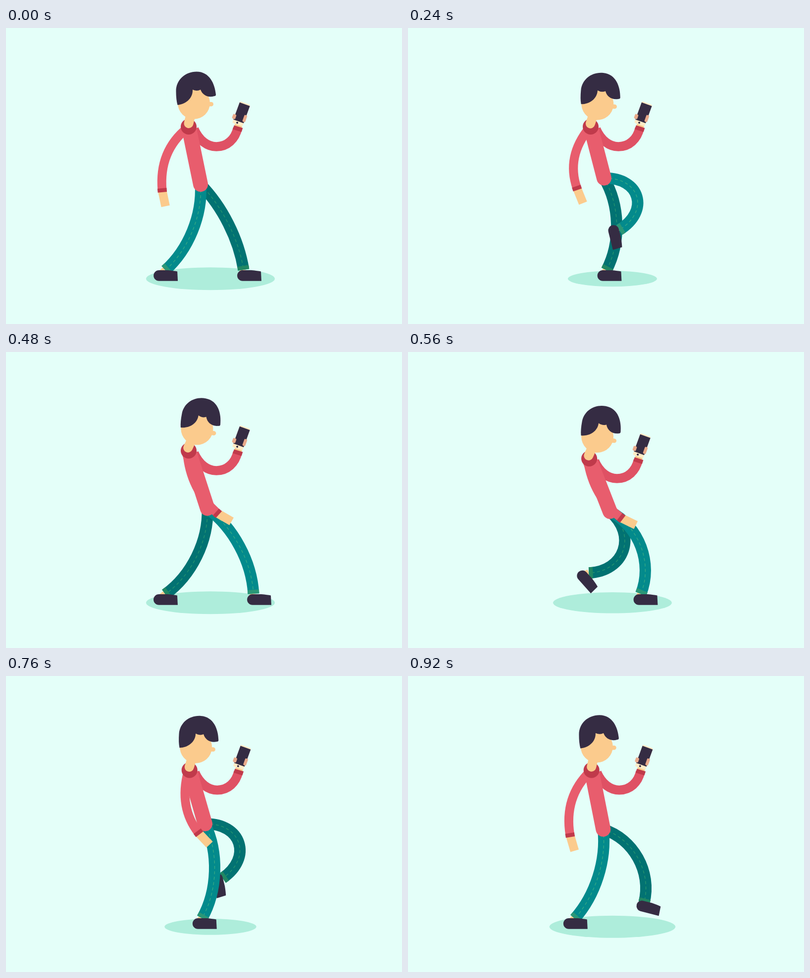
An HTML page with a canvas that plays this animation: 800x600 px, repeating every 0.96 s.

```html
<!DOCTYPE html>
<html lang="en">
<head>
<meta charset="utf-8">
<title>Walking with a phone</title>
<style>
html, body { margin: 0; width: 100%; height: 100%; overflow: hidden; background: #e4fff9; }
canvas { display: block; }
</style>
</head>
<body>
<canvas id="stage" width="800" height="600"></canvas>
<script>
const ctx = document.getElementById('stage').getContext('2d');
const LOOP = 960, HALF = LOOP / 2, STEP = 40, TAU = Math.PI * 2;
const INK = '#352c43', SKIN = '#fbcb8d', SHIRT = '#e85d6d', SLEEVE = '#df5164',
      RIB = '#c03a4b', CREAM = '#fdebc6', FINGER = '#e9aa8b';
const GROUND = 502, LIFT_OFF = 309;
const NEAR = { side: 1, land: 498, cloth: '#038a8c', cuff: '#2b9777', stitch: '#35a885' };
const FAR = { side: -1, land: 478, cloth: '#027272', cuff: '#218763', stitch: '#26946f' };

const HAIR = new Path2D('M346.5 156Q343.5 145 343.5 128C343.5 105 362 88.5 385 88.5C411 88.5 422 113 424 135' +
  'Q424 138 421 138C408 142 397 136 393 125Q386 129 377 125C378 143 362 155 346.5 156Z');
const SHOE = new Path2D('M0 -11H18Q30 -10 37 -8.5L38 10.8H0A10.9 10.9 0 0 1 0 -11Z');
const PHONE_ARM = new Path2D('M380 205C390 228 407 240.5 425 240.5C447 240.5 463 225 468 203');

const rad = deg => deg * Math.PI / 180;
const mix = (a, b, u) => a + (b - a) * u;
const smooth = u => { u = Math.min(1, u); return u * u * (3 - 2 * u); };
// Point at a distance from p; 0 degrees hangs straight down, positive swings back
const hang = (p, deg, len) => ({ x: p.x - len * Math.sin(rad(deg)), y: p.y + len * Math.cos(rad(deg)) });

function stroke(path, color, width, cap = 'butt') {
  ctx.strokeStyle = color;
  ctx.lineWidth = width;
  ctx.lineCap = cap;
  ctx.stroke(path);
}
function line(x1, y1, x2, y2, color, width, cap) {
  const p = new Path2D();
  p.moveTo(x1, y1);
  p.lineTo(x2, y2);
  stroke(p, color, width, cap);
}
function fill(path, color) {
  ctx.fillStyle = color;
  ctx.fill(path);
}
function ellipse(x, y, rx, ry, color) {
  const p = new Path2D();
  p.ellipse(x, y, rx, ry, 0, 0, TAU);
  fill(p, color);
}
function box(x, y, w, h, r, color) {
  const p = new Path2D();
  p.roundRect(x, y, w, h, r);
  fill(p, color);
}
function group(x, y, deg, draw) {
  ctx.save();
  ctx.translate(x, y);
  ctx.rotate(rad(deg));
  draw();
  ctx.restore();
}

// The foot swings forward in the first half, then slides back on the ground
function foot(hip, phase, { side, land }) {
  const u = phase % HALF / HALF;
  if (phase >= HALF) {
    const x = mix(land, LIFT_OFF, u);
    return { x, y: GROUND, turn: 0, ax: x + mix(2, 13, u), ay: GROUND - 12 + 2 * u };
  }
  const arc = Math.sin(Math.PI * u), ahead = u + 0.09 * Math.sqrt(arc);
  const lift = Math.sin(Math.PI * u ** 1.1) ** 0.75;
  const x = mix(LIFT_OFF, land, ahead) + hip.x - 400 + side * 7 * (1 - 2 * ahead);
  const y = GROUND - 92 * lift;
  const turn = 76 * Math.sin(Math.PI / 2 * Math.min(1, u / 0.38)) * smooth((1 - u) / 0.3);
  return { x, y, turn, ax: x + mix(13, 2, u) + 4 * lift, ay: y - 11 + 10 * lift };
}

// A leg of fixed length bows forward as hip and ankle come closer
function leg(hip, phase, look) {
  const { x, y, turn, ax, ay } = foot(hip, phase, look);
  const dx = ax - hip.x, dy = ay - hip.y, chord = Math.hypot(dx, dy);
  const length = 203 + 0.6 * (hip.x - 400);
  const bow = 0.42 * Math.sqrt(Math.max(0, length ** 2 - chord ** 2)) / chord;
  const f = 0.32 * chord / length;
  const bend = k => [hip.x + dx * k + dy * bow, hip.y + dy * k - dx * bow];
  const low = bend(1 - f);
  const lx = low[0] - ax, ly = low[1] - ay, k = 8 / Math.hypot(lx, ly);

  const p = new Path2D();
  p.moveTo(hip.x, hip.y);
  p.bezierCurveTo(...bend(f), ...low, ax, ay);
  line(ax, ay, x, y, SKIN, 15);
  stroke(p, look.cloth, 23);
  ctx.setLineDash([6, 5]);
  stroke(p, look.stitch, 1.4);
  ctx.setLineDash([]);
  line(ax + lx * k, ay + ly * k, ax, ay, look.cuff, 23);
  group(x, y, turn, () => fill(SHOE, INK));
}

function phoneArm(neck) {
  group(neck.x - 369, neck.y - 199, 0, () => {
    line(468, 204, 472, 186, SKIN, 15);
    stroke(PHONE_ARM, SLEEVE, 18.5);
    line(467, 208, 469.6, 200, RIB, 18.5);
    group(475.5, 173.3, 20, () => {
      box(-11, -22.5, 22, 46.5, 2, CREAM);
      box(-11, -20, 22, 37, 0, INK);
      ellipse(-1.5, 20.4, 2, 2, INK);
      box(-15, 6, 7, 9.5, 2, FINGER);
      box(7, 0, 6, 14.5, 2, FINGER);
    });
  });
}

function swingArm(neck, swing, beat) {
  const elbow = hang(neck, 24 + 30 * swing, 79);
  const wrist = hang(neck, 27 * swing - 1, 134.5 + 6 * Math.cos(beat));
  const tip = hang(wrist, 28 * swing - 36, 33);
  const dx = wrist.x - elbow.x, dy = wrist.y - elbow.y, k = 4 / Math.hypot(dx, dy);
  const p = new Path2D();
  p.moveTo(neck.x - 3, neck.y + 4);
  p.quadraticCurveTo(elbow.x, elbow.y, wrist.x, wrist.y);
  line(wrist.x, wrist.y, tip.x, tip.y, SKIN, 17.5);
  stroke(p, SHIRT, 18);
  line(wrist.x - dx * k, wrist.y - dy * k, wrist.x + dx * k, wrist.y + dy * k, RIB, 18.5);
}

function head(neck, t) {
  group(neck.x - 4, neck.y - 12, 5.6 * (1 - Math.cos(TAU * t / LOOP)), () => {
    ctx.translate(-365, -187);
    line(369, 193.5, 375, 168, SKIN, 19, 'round');
    ellipse(379.5, 152.3, 32.5, 32.5, SKIN);
    box(404, 150, 15, 8.8, 4.4, SKIN);
    fill(HAIR, INK);
  });
}

function draw(t) {
  const beat = TAU * t / HALF, bob = Math.sin(beat);
  const swing = Math.cos(TAU * (t - 80) / LOOP);
  const hip = { x: 400 - 8 * swing, y: 310.7 + 12.7 * Math.cos(beat - TAU / 6) };
  const neck = { x: 369 - 3.4 * bob, y: 199 + 18.5 * bob };
  const shade = 110 + 20 * Math.cos(beat);

  ctx.fillStyle = '#e4fff9';
  ctx.fillRect(0, 0, 800, 600);
  ellipse(413, 508.3, shade, shade * 0.177, '#aeeddb');
  phoneArm(neck);
  leg(hip, (t + HALF) % LOOP, FAR);
  leg(hip, t, NEAR);
  line(neck.x, neck.y + 1, hip.x, hip.y, SHIRT, 30, 'round');
  swingArm(neck, swing, beat);
  ellipse(neck.x, neck.y + 1, 16, 16, RIB);
  head(neck, t);
}

function tick() {
  draw(Math.floor(performance.now() % LOOP / STEP) * STEP);
  requestAnimationFrame(tick);
}
tick();
</script>
</body>
</html>
```
